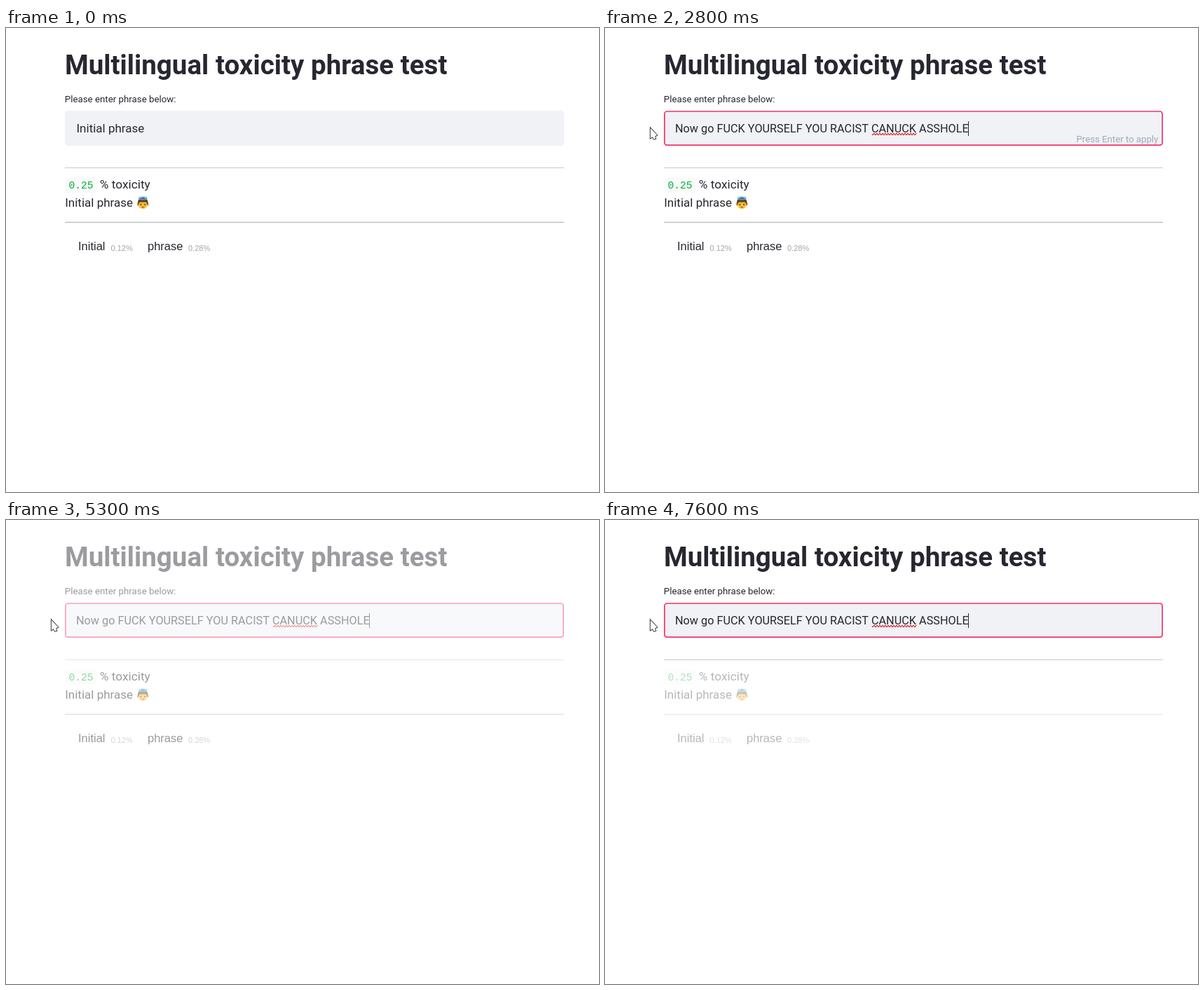
Write an HTML page with a canvas that moves like this. It is 846 by 662 pixels and loops after 8000 ms.

```html
<!DOCTYPE html>
<html lang="en">
<head>
<meta charset="utf-8">
<title>Phrase test</title>
<style>
  html, body { margin: 0; width: 100%; height: 100%; overflow: hidden; background: #fff; }
  canvas { display: block; }
</style>
</head>
<body>
<canvas id="stage" width="846" height="662"></canvas>
<script>
const ctx = document.getElementById('stage').getContext('2d');
const LOOP = 8000, STEP = 100;
const INK = '#262730', PINK = '#f63366';
const SANS = 'Roboto, "Noto Sans", sans-serif';
const ARIAL = '"Liberation Sans", Arial, sans-serif';
const MONO = '"Liberation Mono", monospace';
const LEFT = 84, RIGHT = 796, TEXT_X = 100, TEXT_Y = 149;
const OLD_END = 197, NEW_END = 518;

const lerp = (a, b, p) => a + (b - a) * p;
const clamp01 = v => Math.min(1, Math.max(0, v));

function text(str, x, y, size, { family = SANS, color = INK, weight = 400 } = {}) {
  ctx.font = `${weight} ${size}px ${family}`;
  ctx.fillStyle = color;
  ctx.fillText(str, x, y);
}

function rect(x, y, w, h, color) {
  ctx.fillStyle = color;
  ctx.fillRect(x, y, w, h);
}

function rounded(x, y, w, h, r, fill) {
  ctx.beginPath();
  ctx.roundRect(x, y, w, h, r);
  ctx.fillStyle = fill;
  ctx.fill();
}

function ellipse(x, y, rx, ry, color, from = 0, to = Math.PI * 2) {
  ctx.beginPath();
  ctx.ellipse(x, y, rx, ry, 0, from, to);
  ctx.fillStyle = color;
  ctx.fill();
}

// CSS "ease-in", cubic-bezier(.42, 0, 1, 1)
function easeIn(p) {
  let lo = 0, hi = 1;
  for (let i = 0; i < 20; i++) {
    const s = (lo + hi) / 2, q = 1 - s;
    const x = 1.26 * q * q * s + 3 * q * s * s + s * s * s;
    if (x < p) lo = s; else hi = s;
  }
  return 3 * lo * lo - 2 * lo * lo * lo;
}

const staleOpacity = t => 1 - 0.67 * easeIn(clamp01((t - 4420) / 1000));

function veil(y, h, opacity) {
  if (opacity < 1) rect(0, y, 846, h, `rgba(255,255,255,${1 - opacity})`);
}

function angel(x, y) {
  ellipse(x - 6.8, y + 2, 1.7, 2.2, '#e8a33a');
  ellipse(x + 6.8, y + 2, 1.7, 2.2, '#e8a33a');
  ellipse(x, y - 0.6, 7.4, 6.8, '#5b4033');
  ellipse(x, y + 2.8, 6, 6, '#fbc02d');
  ellipse(x, y - 1, 6.4, 2.6, '#5b4033', Math.PI, Math.PI * 2);
  ellipse(x - 2.8, y + 2.4, 0.9, 1.1, '#40352f');
  ellipse(x + 2.8, y + 2.4, 0.9, 1.1, '#40352f');
  ellipse(x, y + 5.4, 2, 1.2, '#7a4a28', 0, Math.PI);
  ctx.beginPath();
  ctx.ellipse(x, y - 6.6, 5.6, 1.6, 0, 0, Math.PI * 2);
  ctx.strokeStyle = '#4fb0e8';
  ctx.lineWidth = 1.5;
  ctx.stroke();
}

function squiggle(x0, x1, y) {
  ctx.beginPath();
  for (let x = x0; x <= x1; x += 0.5) ctx.lineTo(x, y + Math.sin((x - x0) * Math.PI / 2));
  ctx.strokeStyle = '#e0262e';
  ctx.lineWidth = 1.2;
  ctx.stroke();
}

function initialPhrase(color) {
  text('Initial phrase', TEXT_X + 0.5, TEXT_Y, 17, { color });
}

function selection(from) {
  const w = OLD_END - from;
  rect(from, 133, w, 21, '#1e90ff');
  ctx.save();
  ctx.beginPath();
  ctx.rect(from, 133, w, 21);
  ctx.clip();
  initialPhrase('#fff');
  ctx.restore();
}

function inputBox(t) {
  rounded(LEFT, 118, RIGHT - LEFT, 50, 4.4, '#f0f2f6');
  if (t >= 1500) {
    ctx.beginPath();
    ctx.roundRect(LEFT + 0.9, 119, RIGHT - LEFT - 1.8, 48.1, 3.6);
    ctx.strokeStyle = PINK;
    ctx.lineWidth = 1.7;
    ctx.stroke();
  }
  if (t < 2800) {
    initialPhrase(INK);
    if (t >= 1700) selection(Math.max(TEXT_X, pointer(t).x));
    else if (t >= 1500) rect(OLD_END - 0.5, 133, 1, 21, INK);
    return;
  }
  text('Now go FUCK YOURSELF YOU RACIST CANUCK ASSHOLE', TEXT_X, TEXT_Y, 16.25);
  squiggle(381, 444.5, 151.5);
  if (t < 3800) text('Press Enter to apply', 672.5, 162.5, 13.2, { color: '#a3a8b4' });
  if (Math.floor((t - 2800) / 600) % 2 === 0) rect(NEW_END, 133, 1, 21, INK);
}

function header(t) {
  text('Multilingual toxicity phrase test', 84, 66, 38.55, { weight: 700 });
  text('Please enter phrase below:', 83.8, 106.3, 13.3);
  inputBox(t);
  rect(LEFT, 199, RIGHT - LEFT, 1, '#c9c9cd');
}

function results() {
  rounded(LEFT, 213, 46, 22, 4, '#f9fafa');
  text('0.25', 89.5, 229, 14.6, { family: MONO, color: '#09ab3b' });
  text('% toxicity', 133.8, 229, 17.3);
  text('Initial phrase', LEFT + 0.2, 254.5, 17);
  angel(195.3, 249.5);
  rect(LEFT, 276.5, RIGHT - LEFT, 1.6, '#c4c4c9');
  [['Initial', 103, '0.12%', 149.5], ['phrase', 202, '0.28%', 260]].forEach(([word, x, score, sx]) => {
    text(word, x, 317, 16.5, { family: ARIAL });
    text(score, sx, 318, 11, { family: ARIAL, color: '#a3a3a5' });
  });
}

function arrow(x, y) {
  ctx.beginPath();
  [[0, 0], [0, 16.4], [3.2, 14.4], [5.2, 17.6], [8.4, 16.8], [7.4, 13.2], [10.6, 11.4]]
    .forEach(([dx, dy]) => ctx.lineTo(x + dx, y + dy));
  ctx.closePath();
  ctx.fillStyle = '#fff';
  ctx.fill();
  ctx.strokeStyle = '#4a4a55';
  ctx.lineWidth = 1.1;
  ctx.stroke();
}

function beam(x, y) {
  [['#4c4c55', 3, 0], ['#eeeef2', 1, 1]].forEach(([color, width, inset]) => {
    ctx.strokeStyle = color;
    ctx.lineWidth = width;
    ctx.beginPath();
    ctx.moveTo(x - 3.5 + inset, y - 6.5);
    ctx.lineTo(x + 3.5 - inset, y - 6.5);
    ctx.moveTo(x, y - 7);
    ctx.lineTo(x, y + 7);
    ctx.moveTo(x - 3.5 + inset, y + 6.5);
    ctx.lineTo(x + 3.5 - inset, y + 6.5);
    ctx.stroke();
  });
}

function pointer(t) {
  if (t < 1500) {
    const p = 1 - (1 - clamp01((t - 400) / 700)) ** 2;
    return { x: lerp(82.5, 244.5, p), y: lerp(0, 143.5, p) };
  }
  const p = clamp01((t - 1600) / 300);
  return { x: lerp(200.5, 69, p), y: lerp(143.5, 150, p) };
}

function drawPointer(t) {
  if (t < 400) return;
  if (t >= 2100) return arrow(64.4, 141.6);
  const { x, y } = pointer(t);
  const overText = y > 118 || (x > LEFT && ((y > 32 && y < 74) || (y > 94 && y < 110)));
  (overText ? beam : arrow)(x, y);
}

function draw(t) {
  rect(0, 0, 846, 662, '#fff');
  header(t);
  results();
  const opacity = staleOpacity(t);
  veil(0, 205, t < 7300 ? opacity : 1);
  veil(205, 457, opacity);
  drawPointer(t);
}

const start = performance.now();
function tick() {
  const t = (performance.now() - start) % LOOP;
  draw(Math.floor(t / STEP) * STEP);
  requestAnimationFrame(tick);
}
tick();
</script>
</body>
</html>
```
